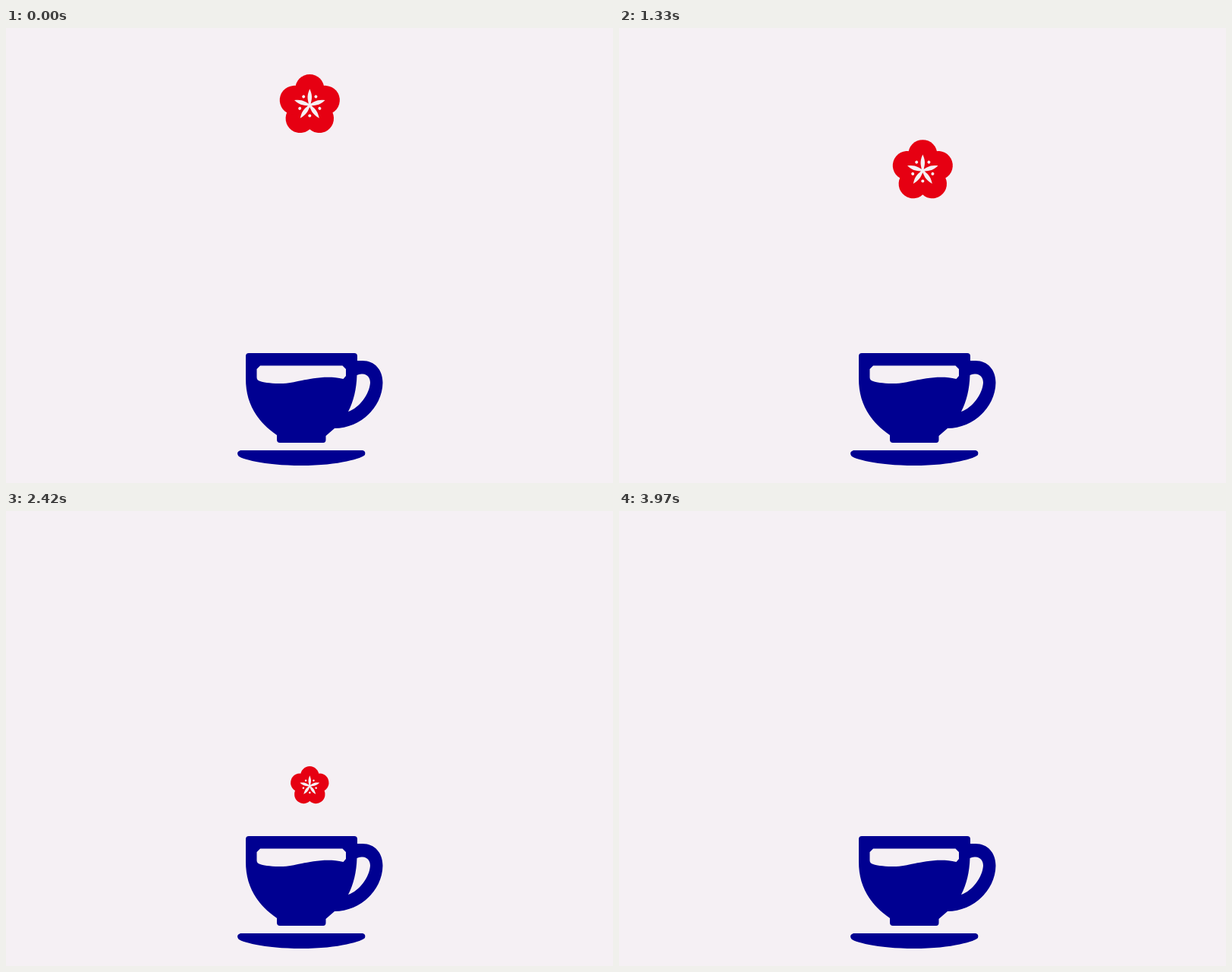
An HTML page for the animation above (4 s loop, 800 by 599 pixels).

```html
<!DOCTYPE html>
<html lang="en">
<head>
<meta charset="utf-8">
<title>Blossom and cup</title>
<style>
  html, body { margin: 0; height: 100%; overflow: hidden; background: #f5f0f4; }
  svg { display: block; width: 100%; height: 100%; }
  .cup { fill: #000091; }
  .petal { fill: #e60012; }
  .gap { fill: #f5f0f4; }
</style>
</head>
<body>
<svg viewBox="0 0 800 599">
  <g class="cup">
    <path d="M320 428H459Q463 428 463 432V438H470C486 438 496.500 450 496.500 467C496 500 466 527 433 527L421.500 537V542Q421.500 546 418 546H361Q357 546 357 542V536C329 517 316 492 316 462V432Q316 428 320 428Z"/>
    <path d="M309 556H470Q474.500 557 473 562C470 566 440 576 389 576C340 576 308 567 306 563Q303 558 309 556Z"/>
  </g>
  <g class="gap">
    <path d="M335 444.500H443.500L448 449V458L444.500 462C423 457 402 462 390 464S375 468 360 468C347 468 338 466 335 465Q330.500 464 330.500 460V449Z"/>
    <path d="M462.500 457Q466 455 470 455.500C476 456 480 460 480 467C479 482 466 500 451 505C458 492 462 475 462.500 457Z"/>
  </g>
  <g id="flower"></g>
</svg>
<script>
  const flower = document.getElementById('flower');
  const FPS = 33, LOOP = 4000;
  const clamp = x => Math.min(1, Math.max(0, x));

  // Repeats a shape five times around the flower's centre
  const ring = (shape, turn = 0) => [0, 1, 2, 3, 4]
    .map(i => `<g transform="rotate(${i * 72 + turn})">${shape}</g>`).join('');

  flower.innerHTML = `<g transform="translate(0 1.9)">
    <g class="petal"><circle r="12"/>${ring('<circle cy="-21.5" r="19.1"/>')}</g>
    <g class="gap">
      ${ring('<path d="M-1.300 0C-1.800 -7 -5 -10 0 -21.300C5 -10 1.800 -7 1.300 0Z"/>')}
      ${ring('<circle cy="-13.8" r="2"/>', 36)}
    </g></g>`;

  function draw(now) {
    const frame = Math.floor((now % LOOP + 5) * FPS / 1000) % (LOOP * FPS / 1000);
    const fall = clamp((frame - 22.4) / 37.6) ** 2;
    const size = 1 - clamp((frame - 60) / 55);
    flower.setAttribute('transform', `translate(400.3 ${99.7 + 261 * fall}) scale(${size})`);
  }

  const start = performance.now();
  function tick() {
    draw(performance.now() - start);
    requestAnimationFrame(tick);
  }
  tick();
</script>
</body>
</html>
```
